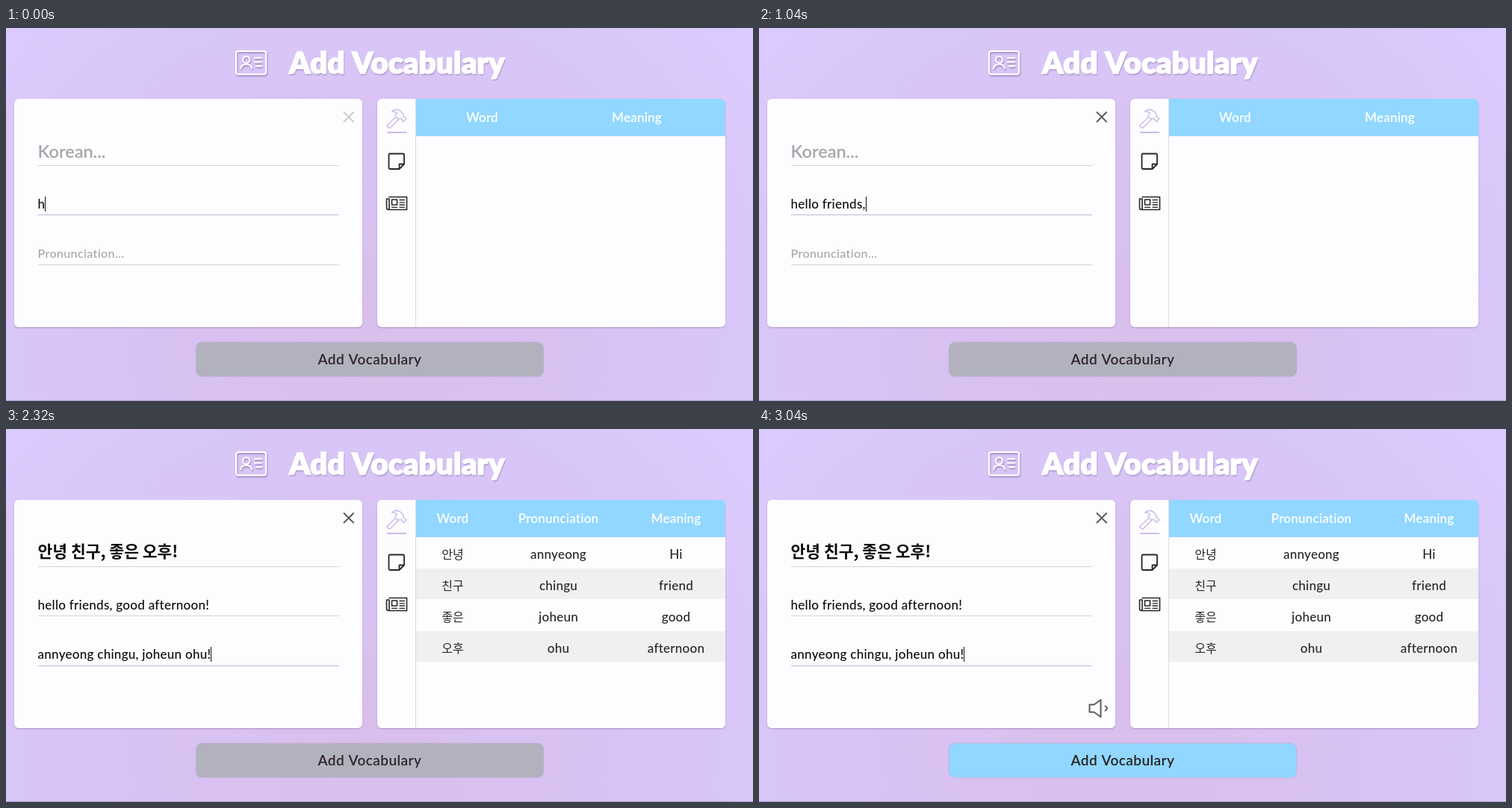
Animation, 1000 px wide and 500 px high, one loop 3.12 s. Source, as an HTML page with a canvas:

```html
<!DOCTYPE html>
<html lang="en">
<head>
<meta charset="utf-8">
<title>Add Vocabulary</title>
<style>
html, body { margin: 0; width: 100%; height: 100%; overflow: hidden; }
canvas { display: block; width: 1000px; height: 500px; }
</style>
</head>
<body>
<canvas id="stage" width="1000" height="500"></canvas>
<script>
const ctx = document.getElementById('stage').getContext('2d');
const LOOP = 3120, TICK = 80, RESULT_AT = 2320, FADE = 240;
const PHRASE = 'hello friends, good afternoon!';
const TYPING = [[0, 1], [640, 7], [1040, 14], [1520, 22], [1920, 29], [2080, 30]];
const ROWS = [
  ['안녕', 'annyeong', 'Hi'],
  ['친구', 'chingu', 'friend'],
  ['좋은', 'joheun', 'good'],
  ['오후', 'ohu', 'afternoon']
];
const LATIN = 'Lato, "Open Sans", sans-serif';
const HANGUL = '"Noto Sans CJK KR", "Noto Sans CJK", sans-serif';
const PAPER = '#fdfcfe', BLUE = '#91d7ff', INK = '#262626', GREY = '#5c5c5e';
const LILAC = '#cdbbe8', HINT = '#a6a6aa', RULE = '#d3d3d8', FOCUS = '#c3b8d8';
const SHADE = 'rgba(128,104,160,.6)';

const clamp = v => Math.max(0, Math.min(1, v));
const mix = (a, b, p) => `rgb(${a.map((v, i) => Math.round(v + (b[i] - v) * p))})`;

function typedCount(t) {
  for (let i = 1; i < TYPING.length; i++) {
    const [t0, n0] = TYPING[i - 1], [t1, n1] = TYPING[i];
    if (t < t1) return Math.floor(n0 + (n1 - n0) * (t - t0) / (t1 - t0));
  }
  return PHRASE.length;
}

function text(str, x, y, { size = 17, weight = 500, color = '#0c0c0c', align = 'left', gap = 0.28, family = LATIN, outline = 0 } = {}) {
  ctx.font = `${weight} ${size}px ${family}`;
  ctx.letterSpacing = gap + 'px';
  ctx.textAlign = align;
  ctx.fillStyle = ctx.strokeStyle = color;
  ctx.fillText(str, x, y);
  if (outline) {
    ctx.shadowColor = 'transparent';
    ctx.lineWidth = outline;
    ctx.lineJoin = 'round';
    ctx.strokeText(str, x, y);
  }
  return ctx.measureText(str).width;
}

function box(x, y, w, h, r, color) {
  ctx.beginPath();
  ctx.roundRect(x, y, w, h, r);
  ctx.fillStyle = color;
  ctx.fill();
}

function stroke(path, color, width) {
  ctx.strokeStyle = color;
  ctx.lineWidth = width;
  ctx.lineJoin = ctx.lineCap = 'round';
  ctx.stroke(new Path2D(path));
}

function withShadow(color, dx, dy, blur, draw) {
  ctx.save();
  ctx.shadowColor = color;
  ctx.shadowOffsetX = dx;
  ctx.shadowOffsetY = dy;
  ctx.shadowBlur = blur;
  draw();
  ctx.restore();
}

function background() {
  const g = ctx.createRadialGradient(487, 430, 0, 487, 430, 650);
  g.addColorStop(0, '#d9bfec');
  g.addColorStop(0.42, '#d8c2f2');
  g.addColorStop(0.72, '#d9c6f9');
  g.addColorStop(1, '#dccbfe');
  ctx.fillStyle = g;
  ctx.fillRect(0, 0, 1000, 500);
  ctx.fillStyle = '#ada0d2';
  ctx.fillRect(0, 499, 1000, 1);
}

function heading() {
  withShadow(SHADE, 1, 2, 2, () => {
    stroke('M311 31H345Q348 31 348 34V59Q348 62 345 62H311Q308 62 308 59V34Q308 31 311 31Z', '#fff', 2.2);
    stroke('M326 42.5A4.5 4.5 0 1 1 317 42.5A4.5 4.5 0 1 1 326 42.5ZM314 54Q315 48.5 321.5 48.5Q328 48.5 329 54', '#fff', 2);
    stroke('M333 40H342M333 45.5H342M335 51H342', '#fff', 2);
  });
  withShadow(SHADE, 1, 2, 2, () => {
    text('Add Vocabulary', 379, 61, { size: 40, weight: 900, color: '#fff', gap: 0.25, outline: 1.4 });
  });
}

function panel(x) {
  withShadow('rgba(110,85,145,.45)', 0, 1, 2, () => box(x, 95, 466, 306, 6, PAPER));
}

function underline(y, color) {
  ctx.fillStyle = color;
  ctx.fillRect(43, y, 403, 1);
}

function caret(x, y) {
  ctx.fillStyle = '#111';
  ctx.fillRect(Math.round(x), y, 1, 20);
}

function form(t, done) {
  panel(11);
  ctx.globalAlpha = clamp(0.3 + t / FADE);
  stroke('M452.5 113L465 125.5M465 113L452.5 125.5', GREY, 2);
  ctx.globalAlpha = 1;

  underline(184, RULE);
  underline(250, done ? RULE : FOCUS);
  underline(317, done ? FOCUS : RULE);

  const english = text(PHRASE.slice(0, typedCount(t)), 42.5, 241.5);
  if (!done) {
    text('Korean...', 42.5, 174, { size: 23.5, weight: 600, color: HINT, gap: 0 });
    text('Pronunciation...', 42.5, 308, { size: 16, color: HINT, gap: 0.4 });
    caret(42.5 + english, 226);
    return;
  }
  text('안녕 친구, 좋은 오후!', 42.5, 172, { size: 21.5, weight: 700, family: HANGUL, gap: 0 });
  caret(42.5 + text('annyeong chingu, joheun ohu!', 42.5, 308), 292);

  ctx.globalAlpha = clamp((t - RESULT_AT) / FADE);
  stroke('M442.5 369.5H448.5L457.5 363V386L448.5 379.5H442.5Z', GREY, 2);
  stroke('M463.5 371.5Q468.5 374.5 463.5 377.5', GREY, 2);
  ctx.globalAlpha = 1;
}

function toolbar() {
  stroke('M510 130.5L522 119L525.5 122.5L514 134Q511.5 134.5 510 130.5Z', LILAC, 1.5);
  stroke('M520.5 117.5L523.5 114.5Q521 111.5 516.5 112Q522.5 107 528.5 111.5L532 115.5V118.5L536 121.5L532 125.5L529 121.5H526.5L524.5 123', LILAC, 1.5);
  ctx.fillStyle = LILAC;
  ctx.fillRect(510, 139, 26, 2);

  stroke('M514 168.5H531.5Q533 168.5 533 170V182.5L526.5 189H514Q512.5 189 512.5 187.5V170Q512.5 168.5 514 168.5ZM526.5 189V182.5H533', INK, 1.8);

  stroke('M513 226.5H536.5V243.5H512Q509.5 243.5 509.5 241V229H513V241Q513 243.5 511.5 243.5', INK, 1.6);
  stroke('M516.5 230H523.5V237H516.5Z', INK, 1.6);
  stroke('M527 230.5H533.5M527 233.8H533.5M527 237H533.5M516.5 240.3H523.5M527 240.3H533.5', INK, 1.3);

  ctx.fillStyle = '#dcdce0';
  ctx.fillRect(548, 95, 1, 306);
}

function table(done) {
  panel(497);
  toolbar();
  box(549, 95, 414, 50, [0, 6, 0, 0], BLUE);
  const cols = done
    ? [['Word', 598], ['Pronunciation', 739.5], ['Meaning', 897]]
    : [['Word', 637.5], ['Meaning', 844.5]];
  for (const [label, x] of cols)
    text(label, x, 125.5, { weight: 600, color: '#fff', align: 'center', gap: 0.2 });
  if (!done) return;

  ROWS.forEach((row, i) => {
    const y = 145 + i * 42;
    if (i % 2) {
      ctx.fillStyle = '#f0f0f1';
      ctx.fillRect(549, y, 414, 41);
    }
    row.forEach((word, c) => text(word, cols[c][1], y + 28.5, {
      size: c ? 17 : 16, family: c ? LATIN : HANGUL,
      color: INK, align: 'center', gap: c ? 0.25 : 0
    }));
  });
}

function button(t) {
  const p = clamp((t - RESULT_AT) / FADE);
  withShadow('rgba(105,100,140,.45)', 0, 0, 2, () =>
    box(254.5, 421.5, 465, 45.5, 8, mix([178, 178, 190], [145, 215, 255], p)));
  text('Add Vocabulary', 487, 450.5, {
    size: 19, weight: 600, align: 'center', gap: 0.45,
    color: mix([48, 36, 44], [36, 36, 36], p)
  });
}

function frame(now) {
  const t = Math.floor((now % LOOP) / TICK) * TICK;
  const done = t >= RESULT_AT;
  background();
  heading();
  form(t, done);
  table(done);
  button(t);
}

let start;
function tick(now) {
  start ??= now;
  frame(now - start);
  requestAnimationFrame(tick);
}
frame(0);
requestAnimationFrame(tick);
</script>
</body>
</html>
```
